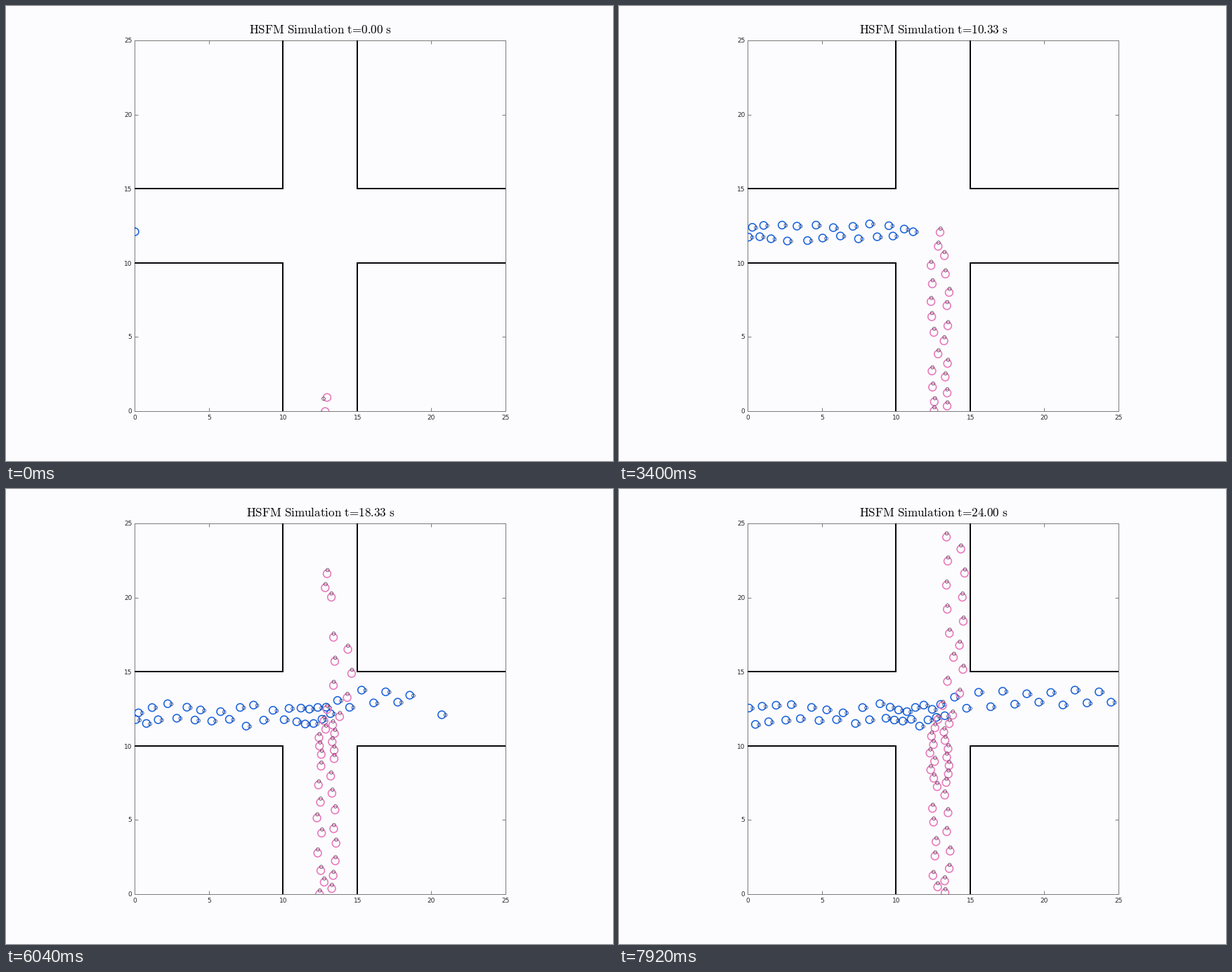
Write a matplotlib script that moves like this. It is 864 by 648 pixels and loops after 8 s.

```python
import numpy as np
import matplotlib.pyplot as plt
from matplotlib.animation import FuncAnimation
from matplotlib.collections import EllipseCollection
from matplotlib.patches import Rectangle

plt.rcParams["mathtext.fontset"] = "cm"
plt.rcParams["font.family"] = "DejaVu Sans"

WIDTH, HEIGHT, DPI = 864, 648, 100
LEFT, TOP, SIDE = 183, 49, 528
RIGHT, BOTTOM = LEFT + SIDE, TOP + SIDE
PX = 72 / DPI                  # one pixel in points
FRAMES, INTERVAL = 400, 20

BODY, HEAD = 5.4, 2.4          # radii in pixels
COUNT = 50                     # walkers in each stream
SPEED, CREEP = 25.2, 8.8       # free and queueing speed, pixels per second
BIRTH_GAP, PASS_GAP = 0.5, 0.68
MEETING, FIRST_PASS = 12.2, 14  # seconds: streams meet, then filter through


def smoothstep(u):
    u = np.clip(u, 0, 1)
    return u * u * (3 - 2 * u)


class Stream:
    """Walkers entering in two staggered lanes that queue at the crossing."""

    def __init__(self, origin, axis, side, heading, gate, drift, together,
                 lead, color, head_color, seed):
        rng = np.random.default_rng(seed)
        self.origin = np.array(origin, float)
        self.axis, self.side = np.array(axis), np.array(side)
        self.gate, self.drift = gate, drift
        self.color, self.head_color = color, head_color

        i = np.arange(COUNT)
        spread = np.minimum(1, i / 3)
        queued = np.maximum(0, i - together + 1)
        self.birth = (BIRTH_GAP * queued
                      + rng.uniform(-0.15, 0.15, COUNT) * (queued > 0))
        self.lane = spread * (10 * (-1.0) ** i + rng.normal(0, 3, COUNT))
        self.start = np.where(i == 0, lead, 0)
        self.heading = heading + rng.uniform(-4, 4, COUNT)

        arrival = self.birth + 1 + (gate - self.start) / SPEED
        self.delayed = arrival > MEETING
        self.passing = arrival.copy()
        last = FIRST_PASS - PASS_GAP
        for k in np.flatnonzero(self.delayed):
            last = self.passing[k] = max(arrival[k], last + PASS_GAP)

    def bodies(self, t):
        age = np.maximum(0, t - self.birth)
        free = self.start + SPEED * (age - 1 + np.exp(-age))
        wait = t - self.passing
        held = self.gate + np.where(wait > 0, SPEED, CREEP) * wait
        along = np.minimum(free, held)
        push = self.drift * smoothstep((along - self.gate + 30) / 70)
        across = self.lane + push * self.delayed
        along = np.where(t < self.birth, -100, along)
        return (self.origin + along[:, None] * self.axis
                + across[:, None] * self.side)

    def heads(self, t):
        angle = np.radians(self.heading - 118 * max(0, 1 - t))
        offset = np.column_stack([np.cos(angle), np.sin(angle)])
        return self.bodies(t) + 5.3 * offset

    def add_to(self, ax, clip):
        def rings(radius, color, width):
            ring = EllipseCollection(
                2 * radius, 2 * radius, 0, units="x", offsets=[(0, 0)],
                offset_transform=ax.transData, facecolors="none",
                edgecolors=color, linewidths=width * PX, zorder=3)
            ax.add_collection(ring, autolim=False)
            ring.set_clip_path(clip)
            return ring

        self.body_rings = rings(BODY, self.color, 1.6)
        self.head_rings = rings(HEAD, self.head_color, 0.7)

    def show(self, t):
        self.body_rings.set_offsets(self.bodies(t))
        self.head_rings.set_offsets(self.heads(t))


east = Stream(origin=(LEFT + 0.5, 321.5), axis=(1, 0), side=(0, 1), heading=6,
              gate=282, drift=-24, together=1, lead=0,
              color="#1c64dc", head_color="#1d3a80", seed=4)
north = Stream(origin=(457, BOTTOM + 0.5), axis=(0, -1), side=(1, 0),
               heading=-84, gate=257, drift=22, together=2, lead=20,
               color="#e878bc", head_color="#4a3044", seed=9)

fig = plt.figure(figsize=(WIDTH / DPI, HEIGHT / DPI), dpi=DPI,
                 facecolor="#fcfcfe")
ax = fig.add_axes([0, 0, 1, 1])
ax.axis("off")
ax.set_xlim(0, WIDTH)
ax.set_ylim(HEIGHT, 0)
ax.set_autoscale_on(False)


def line(xs, ys, color, width):
    ax.plot(xs, ys, color=color, lw=width * PX, solid_capstyle="butt",
            solid_joinstyle="miter", snap=False)


def draw_axes():
    gray = "#7c7c7c"
    left, top, right, bottom = np.array([LEFT, TOP, RIGHT, BOTTOM]) + 0.5
    line([left, right, right, left, left], [top, top, bottom, bottom, top],
         gray, 1)
    style = dict(fontsize=6.5, color="#262626", va="center")
    for value in range(0, 26, 5):
        step = round(value * SIDE / 25)
        x, y = left + step, bottom - step
        for edge, inner in ((top, top + 5), (bottom, bottom - 5)):
            line([x, x], [edge, inner], gray, 1)
        for edge, inner in ((left, left + 5), (right, right - 5)):
            line([edge, inner], [y, y], gray, 1)
        ax.text(x, 586.5, str(value), ha="center", **style)
        ax.text(179.5, y + 0.5, str(value), ha="right", **style)


def draw_walls():
    near, far = round(SIDE * 10 / 25), round(SIDE * 15 / 25)
    for x_edge, x in ((LEFT, LEFT + near), (RIGHT, LEFT + far)):
        for y_edge, y in ((TOP, TOP + near), (BOTTOM, TOP + far)):
            line([x_edge, x, x], [y, y, y_edge], "#08060c", 2)


draw_axes()
draw_walls()
clip = Rectangle((LEFT, TOP), SIDE, SIDE, transform=ax.transData)
for stream in (east, north):
    stream.add_to(ax, clip)
title = ax.text(447.4, 38.7, "", ha="center", va="baseline", fontsize=12.3,
                color="black")


def update(frame):
    # Simulated thirds of a second last 100, 130 and 100 ms in turn.
    cycle, rest = divmod(frame * INTERVAL, 330)
    t = cycle + ((rest >= 100) + (rest >= 230)) / 3
    title.set_text(r"$\mathrm{HSFM\ Simulation\ t\hspace{-0.2}="
                   r"\hspace{-0.2}%.2f\ s}$" % t)
    for stream in (east, north):
        stream.show(t)
    return []


animation = FuncAnimation(fig, update, frames=FRAMES, interval=INTERVAL,
                          init_func=lambda: update(0), repeat=True,
                          repeat_delay=0)
plt.show()
```
